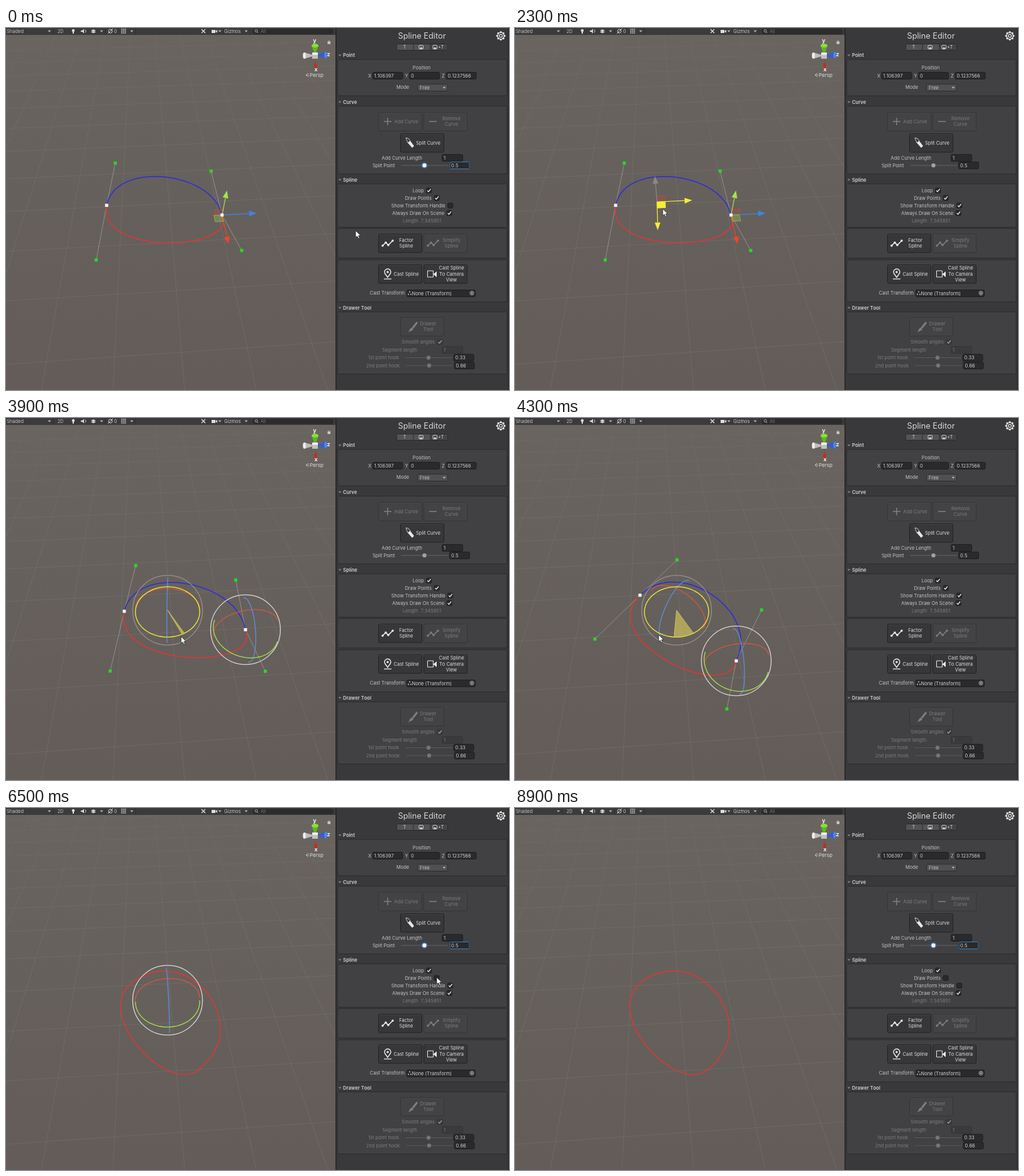
These frames come from a looping animation (800 px wide and 577 px high, 9.5 s). An HTML page with a canvas:

```html
<!DOCTYPE html>
<html lang="en">
<head>
<meta charset="utf-8">
<title>Curve tool</title>
<style>
html, body { margin: 0; width: 100%; height: 100%; overflow: hidden; background: #39383a; }
canvas { display: block; }
</style>
</head>
<body>
<canvas id="stage" width="800" height="577"></canvas>
<script>
const g = document.getElementById('stage').getContext('2d');
const TAU = Math.PI * 2, RAD = Math.PI / 180, LOOP = 9500;
const RED = '#e23534', BLUE = '#2c2bdc', GREEN = '#a6e34c', YELLOW = '#f5ee35';
const AXIS_RED = '#f04527', AXIS_BLUE = '#3f83e6';
const LIT = '#e8e8e8', DIM = '#7d7c7e', LABEL = '#c6c6c6';

const clamp = v => Math.max(0, Math.min(1, v));
const mix = (a, b, k) => a.map((v, i) => v + (b[i] - v) * k);
const add = (a, b, k = 1) => a.map((v, i) => v + b[i] * k);
// legs: [start time, end time, goal]
const travel = (start, legs, t) =>
  legs.reduce((p, [from, to, goal]) => mix(p, goal, clamp((t - from) / (to - from))), start);

// --- drawing helpers ---
function rect(x, y, w, h, fill, edge, r = 0) {
  g.beginPath();
  g.roundRect(x, y, w, h, r);
  if (fill) { g.fillStyle = fill; g.fill(); }
  if (edge) { g.strokeStyle = edge; g.lineWidth = 1; g.stroke(); }
}
function line(points, color, width = 1) {
  g.beginPath();
  points.forEach(p => g.lineTo(...p));
  g.strokeStyle = color; g.lineWidth = width;
  g.stroke();
}
function poly(points, fill, edge) {
  g.beginPath();
  points.forEach(p => g.lineTo(...p));
  g.closePath();
  g.fillStyle = fill;
  g.fill();
  if (edge) { g.strokeStyle = edge; g.lineWidth = 0.8; g.stroke(); }
}
function circle(x, y, r, color, width = 1, from = 0, to = TAU) {
  g.beginPath();
  g.arc(x, y, r, from, to);
  g.strokeStyle = color; g.lineWidth = width;
  g.stroke();
}
function dot(x, y, r, color) {
  g.beginPath();
  g.arc(x, y, r, 0, TAU);
  g.fillStyle = color;
  g.fill();
}
const square = ([x, y], color) => rect(x - 2.5, y - 2.5, 5, 5, color);
const caret = (x, y, color = '#b5b5b5') => poly([[x - 2.5, y - 1.3], [x + 2.5, y - 1.3], [x, y + 1.7]], color);
// y is the vertical middle of the text
function text(s, x, y, color = LABEL, size = 7.5, align = 'left', weight = 400) {
  g.font = `${weight} ${size}px Inter, sans-serif`;
  g.fontKerning = 'none';
  g.textAlign = align;
  g.fillStyle = color;
  g.fillText(s, x, y + size * 0.36);
  return g.measureText(s).width;
}

// --- camera and world, points are [right, up, away] ---
const FOCAL = 490, EYE = [0, 4.9, 0], YAW = 0.065;
const COS = Math.cos(50 * RAD), SIN = Math.sin(50 * RAD);
const depthOf = p => p[2] * COS + (EYE[1] - p[1]) * SIN;
function project(p) {
  const k = FOCAL / depthOf(p);
  return [262 + p[0] * k, 294 + ((EYE[1] - p[1]) * COS - p[2] * SIN) * k];
}
const worldSize = (pixels, at) => pixels * depthOf(at) / FOCAL;
function spin([x, y, d], angle) {
  const c = Math.cos(angle), s = Math.sin(angle);
  return [x * c - d * s, y, x * s + d * c];
}
const UP = [0, 1, 0], SIDE = spin([1, 0, 0], YAW), NEAR = spin([0, 0, -1], YAW);

function drawGround() {
  const bg = g.createLinearGradient(0, 12, 0, 577);
  bg.addColorStop(0, '#696460');
  bg.addColorStop(1, '#635c58');
  rect(0, 11, 524, 566, bg);
  const grid = g.createLinearGradient(0, 12, 0, 577);
  grid.addColorStop(0, 'rgba(150,148,145,.1)');
  grid.addColorStop(0.4, 'rgba(150,148,145,.24)');
  grid.addColorStop(1, 'rgba(150,148,145,.28)');
  const at = (u, v) => project(add(add([0, 0, 0], SIDE, u), NEAR, -v));
  for (let i = -13.75; i < 14; i++) line([at(i, 0), at(i, 19)], grid, 0.8);
  for (let j = 0.35; j < 19; j++) line([at(-14, j), at(14, j)], grid, 0.8);
}

// --- transform handles ---
function arrow(o, dir, color) {
  const a = project(o), b = project(add(o, dir, worldSize(56, o)));
  const n = Math.hypot(b[0] - a[0], b[1] - a[1]), ux = (b[0] - a[0]) / n, uy = (b[1] - a[1]) / n;
  const base = add(b, [ux, uy], -12);
  line([a, base], color, 1.2);
  poly([b, add(base, [-uy, ux], 4.5), add(base, [uy, -ux], 4.5)], color);
}
function plane(o, u, v, fill, edge) {
  const s = worldSize(13, o);
  poly([o, add(o, u, s), add(add(o, u, s), v, s), add(o, v, s)].map(project), fill, edge);
}
function moveHandle(o, right, hot) {
  const side = SIDE.map(v => right ? v : -v);
  plane(o, side, UP, 'rgba(200,70,45,.3)', 'rgba(200,80,60,.7)');
  arrow(o, UP, hot ? '#8d8986' : GREEN);
  arrow(o, SIDE, hot ? YELLOW : AXIS_BLUE);
  arrow(o, NEAR, hot ? YELLOW : AXIS_RED);
  plane(o, side, NEAR, hot ? YELLOW : 'rgba(150,190,70,.4)', hot ? YELLOW : 'rgba(165,200,85,.8)');
}
// Only the half that faces the camera, unless whole
function ring(o, u, v, color, whole) {
  const r = worldSize(51, o), toEye = add(EYE, o, -1);
  g.beginPath();
  let pen = false;
  for (let i = 0; i <= 96; i++) {
    const a = i * TAU / 96, p = add(u.map(w => w * Math.cos(a)), v, Math.sin(a));
    const front = whole || p[0] * toEye[0] + p[1] * toEye[1] + p[2] * toEye[2] >= 0;
    if (front) g[pen ? 'lineTo' : 'moveTo'](...project(add(o, p, r)));
    pen = front;
  }
  g.strokeStyle = color; g.lineWidth = 1.3;
  g.stroke();
}
function turnHandle(o, angle, hot) {
  const side = spin(SIDE, angle), near = spin(NEAR, angle);
  circle(...project(o), 55.5, hot ? '#96918d' : '#d9d6d3', 1.3);
  ring(o, side, UP, '#d2583c');
  ring(o, near, UP, '#5b8fe0');
  ring(o, SIDE, NEAR, hot ? YELLOW : GREEN, hot);
}

// --- spline: two anchors with handles, relative to the pivot ---
const local = {
  a: [-0.873, 0, -0.096], a1: [-0.846, 0, 1.257], a2: [-0.885, 0, -1.437],
  b: [1.542, 0, -0.362], b1: [1.43, 0, 0.972], b2: [1.819, 0, -1.229]
};
const GRIP = -60 * RAD;

const pivotAt = t => travel([-0.484, 0, 4.405],
  [[2300, 2900, [-0.18, 0, 3.77]], [2900, 3100, [-0.064, 0, 3.905]]], t);
// fast start, slower finish
const angleAt = t => {
  const u = clamp((t - 3850) / 950);
  return -54.5 * RAD * u * (1.6 - 0.6 * u);
};
const onRing = (o, angle, pixels) => add(o, spin([1, 0, 0], angle), worldSize(pixels, o));

function curve(p0, p1, p2, p3, color) {
  const points = [];
  for (let i = 0; i <= 40; i++) {
    const k = i / 40, a = mix(p0, p1, k), b = mix(p1, p2, k), c = mix(p2, p3, k);
    points.push(project(mix(mix(a, b, k), mix(b, c, k), k)));
  }
  line(points, color, 1.5);
}

function drawSpline(t, s) {
  const o = pivotAt(t), angle = angleAt(t), turning = t >= 3500;
  const hover = t >= 1700 && t < 3000, held = t >= 3800 && t < 4900;
  const [a, a1, a2, b, b1, b2] = Object.values(local).map(p => add(o, spin(p, angle)));
  if (s.points) [[a, a1], [a, a2], [b, b1], [b, b2]]
    .forEach(ends => line(ends.map(project), 'rgba(190,186,182,.65)', 0.8));
  curve(a, a1, b1, b, s.points ? BLUE : RED);
  curve(b, b2, a2, a, RED);

  if (s.handle && !turning) moveHandle(o, hover, hover);
  if (s.handle && turning) {
    turnHandle(o, held ? angle : 0, held);
    if (held && angle) {
      const slice = [o];
      for (let i = 0; i <= 12; i++) slice.push(onRing(o, GRIP + angle * i / 12, 51));
      poly(slice.map(project), 'rgba(200,187,92,.75)', '#d6ca62');
    }
  }
  if (!s.points) return;
  if (turning) turnHandle(b, 0, false);
  else moveHandle(b, hover, false);
  [a1, a2, b1, b2].forEach(p => square(project(p), '#22dc20'));
  [a, b].forEach(p => square(project(p), '#f5f5f5'));
}

// --- scene chrome ---
function drawToolbar() {
  rect(0, 0, 524, 11, '#3b3a3c');
  text('Shaded', 1, 5);
  text('2D', 82, 5, LABEL, 7);
  dot(107, 4, 2.3, '#ddd'); rect(106, 6, 2, 3, '#ddd');
  poly([[119, 4], [121, 4], [124, 1.5], [124, 8.5], [121, 6], [119, 6]], '#ddd');
  circle(124, 5, 3, '#ddd', 1, -1, 1);
  [4, 6.5].forEach(y => poly([[135, y], [139, y - 2], [143, y], [139, y + 2]], '#ccc'));
  circle(166, 5, 3, '#ccc'); line([[162, 9], [170, 1]], '#ccc');
  text('0', 172, 5, '#ccc', 7);
  for (let i = 0; i < 3; i++) {
    line([[183, 2 + 3 * i], [191, 2 + 3 * i]], '#bbb', 0.8);
    line([[184 + 3 * i, 1], [184 + 3 * i, 9]], '#bbb', 0.8);
  }
  line([[311, 2], [317, 8]], '#ddd', 1.5); line([[317, 2], [311, 8]], '#ddd', 1.2);
  rect(327, 3, 6, 5, '#ddd'); poly([[333, 5], [336, 3], [336, 8]], '#ddd');
  text('Gizmos', 347, 5);
  [69, 152, 200, 340, 382].forEach(x => {
    caret(x, 5);
    line([[x + 6, 0], [x + 6, 11]], '#2b2b2c', 0.7);
  });
  rect(392, 1, 129, 9, '#2c2b2d', null, 4);
  circle(398, 4.5, 2, '#aaa'); line([[399.5, 6], [401, 8]], '#aaa');
  text('All', 405, 5, '#777', 7);
}

function compassCone(dx, dy, side, cap) {
  const x = 491.5 + dx, y = 44 + dy, wide = dx ? 2.3 : 5.5, tall = dx ? 5 : 3;
  poly([[491.5, 44], [x - (dx ? 0 : wide), y - (dx ? tall : 0)], [x + (dx ? 0 : wide), y + (dx ? tall : 0)]], side);
  g.beginPath();
  g.ellipse(x, y, wide, tall, 0, 0, TAU);
  g.fillStyle = cap;
  g.fill();
}
function drawCompass() {
  compassCone(0, -16, '#61b520', '#83e431');
  compassCone(-17, 0, '#bdbdbd', '#efefef');
  compassCone(17, -1, '#315fce', '#4d86f2');
  compassCone(1, 17, '#a72419', '#c42d1f');
  rect(487, 39, 9, 10, '#bfc0c0'); rect(487, 39, 9, 4, '#ededed');
  text('y', 491, 20, '#fff', 9, 'center', 600);
  text('z', 513, 42, '#fff', 9, 'center', 600);
  text('x', 493, 66, '#fff', 9, 'center', 600);
  line([[481, 72], [477, 75], [481, 78]], '#ccc', 0.8); line([[477, 75], [482, 75]], '#ccc', 0.8);
  text('Persp', 483, 75, '#dedede', 8);
  rect(511.5, 22, 4.5, 3.5, '#ccc'); circle(513.7, 22, 1.5, '#ccc', 1, Math.PI, TAU);
}

// --- side panel ---
function section(title, y, height) {
  if (title) {
    caret(531, y - 6, '#818082');
    text(title, 536, y - 6, '#d2d2d2', 7.6, 'left', 600);
  }
  rect(527.5, y + 0.5, 269.5, height, '#414042', '#2b2a2c', 2);
}
function button(x, y, label, on, icon) {
  rect(x + 0.5, y + 0.5, 69, 29.5, on ? '#373638' : '#434244', on ? '#222123' : '#353436', 2);
  line([[x + 2, y + 1.5], [x + 68, y + 1.5]], '#4a494b', 0.7);
  const rows = label.split('|');
  rows.forEach((s, i) =>
    text(s, x + 44.5, y + 15 + (i - (rows.length - 1) / 2) * 9.3, on ? '#dedede' : DIM, 7.5, 'center'));
  icon(x + 15, y + 15, on ? LIT : DIM);
}
function field(x, y, w, value, on = true) {
  rect(x + 0.5, y + 0.5, w, 11, on ? '#2a292b' : '#3a393b', on ? '#1f1f20' : '#343335', 2);
  text(value, x + 3, y + 6, on ? '#cfcfcf' : DIM);
}
function checkRow(label, y, checked, on = true) {
  g.font = '7.5px Inter, sans-serif';
  const x = 661.7 - (g.measureText(label).width + 12) / 2;
  const box = x + text(label, x, y, on ? LABEL : DIM) + 8;
  rect(box - 4, y - 4, 8, 8, on ? '#29282a' : '#3b3a3c', on ? '#1f1f20' : '#343335', 1.5);
  if (checked) line([[box - 2.5, y], [box - 0.7, y + 2], [box + 3, y - 2.5]], on ? '#e6e6e6' : '#9a999b', 1.3);
}
function sliderRow(label, y, x, value, on, focus) {
  text(label, x - 47, y, on ? LABEL : DIM, 7.5, 'right');
  line([[x - 37, y], [x + 38, y]], on ? '#656467' : '#59585a', 1.2);
  if (focus) dot(x, y, 5, '#3f6e9f');
  dot(x, y, 3.2, focus ? '#f2f2f2' : on ? '#a2a1a3' : '#757476');
  field(x + 39.5, y - 6, 32, value, on);
  if (focus) rect(x + 40.5, y - 5.5, 31, 11, null, '#3d7fc0', 2);
}

const plus = (x, y, c) => { minus(x, y, c); line([[x, y - 6], [x, y + 6]], c, 1.6); };
const minus = (x, y, c) => line([[x - 6, y], [x + 6, y]], c, 1.6);
const knife = (x, y, c) => {
  poly([[x - 6, y - 8], [x - 2, y - 7], [x + 1, y - 3], [x - 3, y]], 'transparent', c);
  poly([[x - 3, y], [x + 1, y - 3], [x + 7, y + 5], [x + 4, y + 8]], c);
};
const zigzag = (x, y, c) => {
  const p = [[x - 8, y + 4], [x - 3, y - 1], [x + 1, y + 3], [x + 8, y - 4]];
  line(p, c, 1.6);
  p.forEach(q => dot(...q, 1.8, c));
};
const pin = (x, y, c) => {
  circle(x, y - 3, 5, c, 1.5, Math.PI * 0.85, Math.PI * 2.15);
  line([[x - 4.5, y - 1], [x, y + 5.5], [x + 4.5, y - 1]], c, 1.5);
  dot(x, y - 3, 1.8, c);
  line([[x - 6, y + 8], [x + 6, y + 8]], c, 1.3);
};
const camera = (x, y, c) => {
  rect(x - 8.5, y - 5, 9, 10, null, c);
  poly([[x + 1, y], [x + 6, y - 4], [x + 6, y + 5], [x + 1, y + 1]], c);
};
const brush = (x, y, c) => {
  line([[x + 12, y - 7], [x + 5, y + 2]], c, 3);
  poly([[x + 4, y + 1], [x + 6, y + 5], [x - 2, y + 9], [x + 1, y + 3]], c);
};
function gear(x, y) {
  for (let a = 0; a < TAU; a += TAU / 8) {
    const c = Math.cos(a), s = Math.sin(a);
    line([[x + 4.5 * c, y + 4.5 * s], [x + 7.3 * c, y + 7.3 * s]], LIT, 2.6);
  }
  circle(x, y, 5.2, LIT, 1.4);
  dot(x, y, 4.4, '#39383a');
  circle(x, y, 2.4, LIT, 1.2);
}

function drawPanel(s) {
  rect(524, 0, 276, 577, '#39383a');
  rect(524, 0, 1.5, 577, '#252526');
  rect(798.5, 0, 1.5, 577, '#2a292b');
  text('Spline Editor', 661.5, 12.5, '#d6d6d6', 12.8, 'center');
  gear(787, 12.5);

  rect(621.5, 25.5, 81, 10, '#535254', '#2a292b', 2);
  rect(675, 26, 27, 9, '#444345');
  [648, 675].forEach(x => line([[x, 26], [x, 35]], '#2d2d2e'));
  text('T', 634, 30.5, '#d4d4d4', 7, 'center');
  [657, 679].forEach(x => {
    rect(x, 27.5, 6.5, 6, null, '#cfcfcf', 1);
    poly([[x + 1, 33], [x + 3, 30], [x + 6, 33]], '#cfcfcf');
  });
  text('+T', 687, 30.5, '#e0e0e0', 7);

  section('Point', 49.5, 58);
  text('Position', 661, 63.5, LABEL, 7.5, 'center');
  ['X1.106397', 'Y0', 'Z0.1237566'].forEach((s, i) => {
    text(s[0], 576 + 58.5 * i, 76);
    field(582.5 + 58.5 * i, 70, 48, s.slice(1));
  });
  text('Mode', 621, 94.5);
  rect(654.5, 89.5, 48, 11, '#504f51', '#2d2d2e', 2);
  text('Free', 658, 95);
  caret(697, 95);

  section('Curve', 124, 108);
  button(592, 134, 'Add Curve', false, plus);
  button(664, 134, 'Remove|Curve', false, minus);
  button(627, 168, 'Split Curve', true, knife);
  text('Add Curve Length', 662, 207, LABEL, 7.5, 'right');
  field(693, 201, 33, '1');
  sliderRow('Split Point', 219, 665.5, '0.5', true, s.focus);

  section('Spline', 248, 69);
  checkRow('Loop', 259, true);
  checkRow('Draw Points', 271, s.points);
  checkRow('Show Transform Handle', 283, s.handle);
  checkRow('Always Draw On Scene', 295, true);
  text('Length  7,545851', 661.5, 307, DIM, 7.5, 'center');

  section('', 319, 47);
  button(592, 328, 'Factor|Spline', true, zigzag);
  button(664, 328, 'Simplify|Spline', false, zigzag);

  section('', 369, 67);
  button(592, 377, 'Cast Spline', true, pin);
  button(664, 377, 'Cast Spline|To Camera|View', true, camera);
  text('Cast Transform', 634, 422.5, LABEL, 7.5, 'right');
  field(637, 417, 109, '');
  [[640, 424.5], [644, 424.5], [642, 420.5]].forEach(p => dot(...p, 0.9, '#ddd'));
  text('None (Transform)', 645.5, 423, '#d2d2d2');
  circle(741, 422.5, 3, '#bbb'); dot(741, 422.5, 1.3, '#ccc');

  section('Drawer Tool', 452, 99);
  button(627, 461, 'Drawer|Tool', false, brush);
  checkRow('Smooth angles', 500.5, true, false);
  text('Segment length', 654, 513, DIM, 7.5, 'right');
  field(693, 507, 33, '1', false);
  sliderRow('1st point hook', 525.5, 672, '0.33');
  sliderRow('2nd point hook', 538, 673, '0.66');
}

function drawPointer(t) {
  const o = pivotAt(t);
  const grab = add(project(o), [9, 11]), grip = project(onRing(o, GRIP + 1.75 * angleAt(t), 54));
  const [x, y] = travel([556, 323], [
    [100, 600, [698, 284]], [600, 900, [703, 281]], [1000, 1700, grab], [3100, 3700, grip],
    [4900, 5300, [662, 314]], [5300, 5800, [685, 270]], [6800, 7300, [701, 281]], [8100, 8800, [88, 515]]
  ], t);
  const shape = [[0, 0], [0, 11], [2.6, 8.7], [4.4, 12.5], [6.3, 11.6], [4.6, 8], [8, 7.7]];
  poly(shape.map(p => add(p, [x, y])), '#fff', '#222');
}

function draw(now) {
  const t = Math.floor(now % LOOP / 100) * 100;
  const state = {
    focus: t < 1900 || t >= 6000,
    points: t < 6000,
    handle: t >= 900 && t < 7500
  };
  drawGround();
  drawCompass();
  drawSpline(t, state);
  drawToolbar();
  drawPanel(state);
  if (t < 8900) drawPointer(t);
  requestAnimationFrame(draw);
}
requestAnimationFrame(draw);
</script>
</body>
</html>
```
